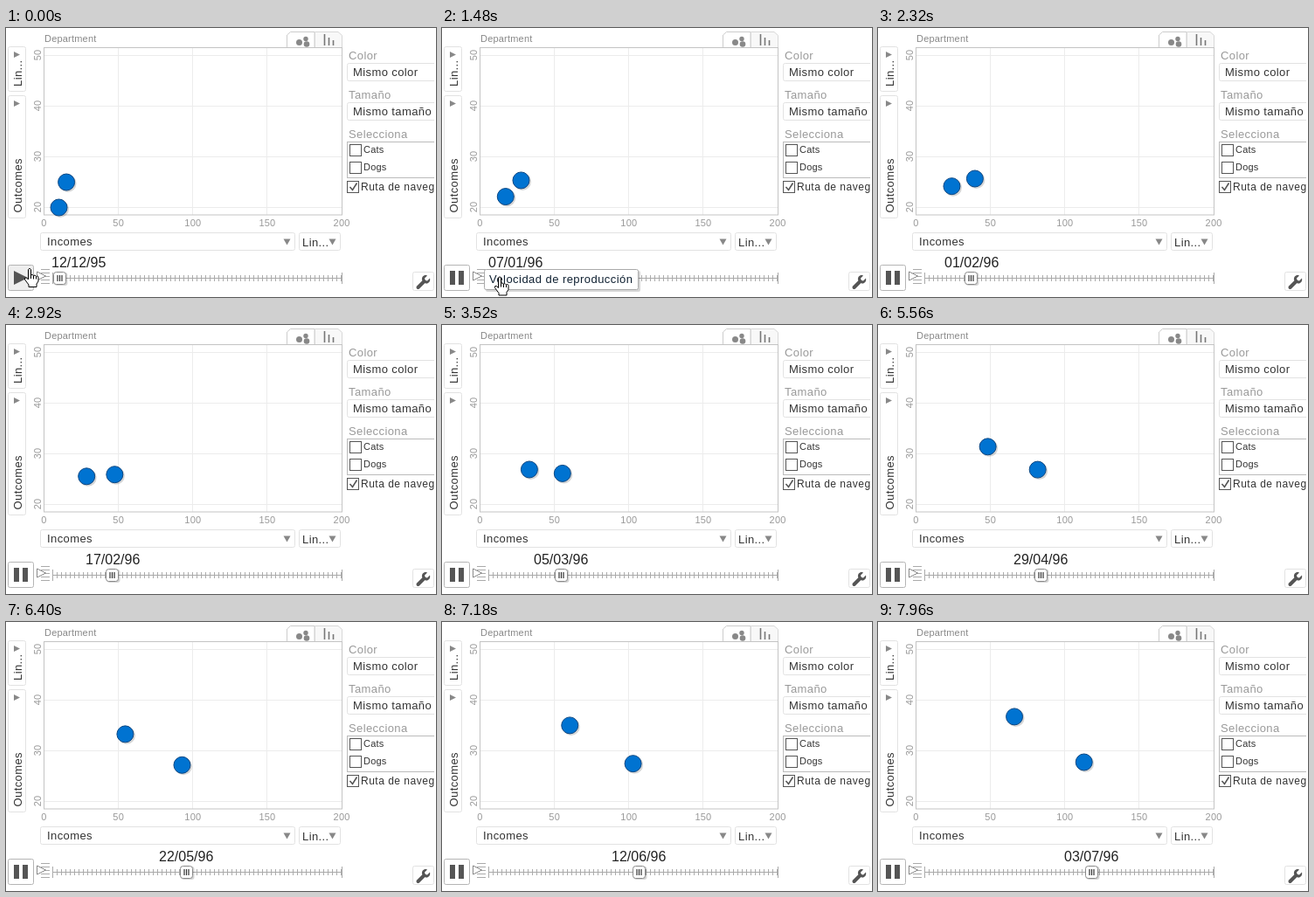
An HTML page that plays this animation: 492 by 308 pixels, repeating every 8 s.

```html
<!DOCTYPE html>
<html lang="es">
<head>
<meta charset="utf-8">
<style>
  html, body { margin: 0; width: 100%; height: 100%; overflow: hidden; background: #fff; }
  svg { display: block; font: 13px "Liberation Sans", Arial, sans-serif; letter-spacing: .4px; fill: #333; }
  .box { fill: #fff; stroke: #e2e2e2; }
  .line { fill: none; stroke: #aaa; }
  .grid { fill: none; stroke: #ececec; }
  .label { fill: #999; }
  .small { font-size: 11px; letter-spacing: .2px; }
  .check { fill: #fff; stroke: #555; }
  .arrow { fill: #888; }
  .icon { fill: #555; }
  .dot { fill: #0073d1; stroke: #0a4682; }
  .shadow { fill: #000; opacity: .16; }
  .date { font-size: 16px; letter-spacing: 0; fill: #222; }
  .tip { letter-spacing: .45px; fill: #123; }
</style>
</head>
<body>
<svg width="492" height="308" viewBox="0 0 492 308">
  <!-- chart -->
  <text class="small" x="44" y="16" fill="#888">Department</text>
  <path d="M321.500 22V8l4-3.500H353V22" fill="#fff" stroke="#ccc"/>
  <path d="M353.500 22V4.500H380l4.500 4V22" fill="#f8f8f8" stroke="#d8d8d8"/>
  <g fill="#888"><circle cx="335.500" cy="16.500" r="3.500"/><circle cx="343" cy="12.500" r="2.700"/><circle cx="344" cy="18.500" r="3.300"/></g>
  <path d="M364.500 7v13M369.500 11v9M374.500 14v6" stroke="#777" stroke-width="1.600"/>
  <path class="grid" d="M128.500 23V214M213.500 23V214M298.500 23V214M44 31.500H384M44 89.500H384M44 147.500H384M44 205.500H384"/>
  <rect x="43.500" y="22.500" width="341" height="191.500" fill="none" stroke="#c4c4c4"/>
  <g id="axes" class="small label" text-anchor="middle"></g>
  <g id="dots"></g>

  <!-- axis pickers -->
  <rect class="box" x="2.500" y="21.500" width="20" height="51" rx="2"/>
  <rect class="box" x="2.500" y="77.500" width="20" height="140" rx="2"/>
  <path class="arrow" d="M9 27l7 3.500-7 3.500zM9 83l7 3.500-7 3.500z"/>
  <text transform="translate(18 67) rotate(-90)">Lin...</text>
  <text transform="translate(18 211.500) rotate(-90)">Outcomes</text>
  <rect class="box" x="39.500" y="234.500" width="291" height="20" rx="2"/>
  <rect class="box" x="335.500" y="234.500" width="47" height="20" rx="2"/>
  <path class="arrow" d="M317.500 241.500h8l-4 7zM369.500 241.500h8l-4 7z"/>
  <text x="47" y="249">Incomes</text>
  <text x="339" y="250">Lin...</text>

  <!-- side panel -->
  <svg width="490" height="308">
    <g class="label">
      <text x="392" y="36">Color</text>
      <text x="392" y="81">Tamaño</text>
      <text x="392" y="126">Selecciona</text>
    </g>
    <rect class="box" x="390.500" y="40.500" width="120" height="20" rx="2"/>
    <rect class="box" x="390.500" y="85.500" width="120" height="20" rx="2"/>
    <text x="397" y="55">Mismo color</text>
    <text x="397" y="100">Mismo tamaño</text>
    <rect x="390.500" y="130.500" width="120" height="41" fill="#fff" stroke="#bbb"/>
    <rect class="check" x="393.500" y="133.500" width="13" height="13"/>
    <rect class="check" x="393.500" y="153.500" width="13" height="13"/>
    <rect class="check" x="390.500" y="175.500" width="13" height="13"/>
    <path d="M393.500 182l3 3.500 5-8" fill="none" stroke="#555" stroke-width="1.600"/>
    <g class="small">
      <text x="409" y="143">Cats</text>
      <text x="409" y="163">Dogs</text>
    </g>
    <text x="406" y="186" style="font-size:12px;letter-spacing:.5px">Ruta de naveg</text>
    <rect class="box" x="465.500" y="279.500" width="24" height="21" rx="2"/>
    <g transform="translate(0 1)">
      <path d="M471.500 296l7-7" stroke="#555" stroke-width="4" stroke-linecap="round"/>
      <path class="icon" d="M482 282.500l-3 3 .5 2.500 2.500.5 3-3c1 4-2 6.500-5 6l-4-4c-.5-4 2.500-6.500 6-5z"/>
    </g>
  </svg>

  <!-- player -->
  <rect id="button" x="2.500" y="271.500" width="29" height="29" rx="2" stroke="#b5b5b5"/>
  <path id="buttonIcon" class="icon"/>
  <path class="line" d="M40 276.500h10M40 280.500h10M40 284.500h10M40 288.500h10M40 292.500h10"/>
  <path d="M35.500 279v10l10-5z" fill="#fff" stroke="#888"/>
  <path id="ticks" class="line"/>
  <g id="knob">
    <rect class="shadow" x="-6" y="280" width="15" height="15" rx="3"/>
    <rect x="-7" y="279.500" width="14" height="14" rx="3" fill="#fff" stroke="#888"/>
    <path d="M-2.500 283v7M0 283v7M2.500 283v7" stroke="#333" stroke-width="1.200"/>
  </g>
  <text id="date" class="date" y="274"></text>
  <g id="tip">
    <rect class="shadow" x="50" y="278" width="177" height="24" rx="2"/>
    <rect x="48.500" y="276.500" width="176" height="23" rx="2" fill="#fff" stroke="#aaa"/>
    <text class="tip" x="54" y="292">Velocidad de reproducción</text>
  </g>
  <path id="hand" fill="#fff" stroke="#000" stroke-linejoin="round"
    d="M-1.500 13V1.500Q0-1 1.500 1.500V8Q3 6.500 4.500 8.500Q6 7 7.500 9.500Q10 8 10 11V15L8 18V21.500H-1V19L-5.500 13Q-6 10-3.500 11ZM1.500 8v4M4.500 8.500v4M7.500 9.500v3"/>
</svg>
<script>
  const LOOP = 8000, START = 400, STEP = 60, DAY = 864e5;
  const FIRST = Date.UTC(1995, 11, 12);
  const TIP_ON = 1120, TIP_OFF = 1780;
  const $ = id => document.getElementById(id);

  // [time, elapsed days] and [time, fingertip x, fingertip y]
  const days = [[400, 0], [1480, 26.2], [2320, 51.2], [3520, 84.2], [4720, 116.2], [6400, 162.2], [7960, 204.2]];
  const path = [[640, 27, 275], [1180, 46, 281], [1480, 66, 284.5]];
  // start and drift per day
  const movers = [[60.5, 205.5, .468, -.4755], [69.1, 176.5, .816, -.0784]];

  function at(keys, t, col = 1) {
    if (t <= keys[0][0]) return keys[0][col];
    for (let i = 1; i < keys.length; i++) {
      const a = keys[i - 1], b = keys[i];
      if (t <= b[0]) return a[col] + (b[col] - a[col]) * (t - a[0]) / (b[0] - a[0]);
    }
    return keys[keys.length - 1][col];
  }

  let labels = '';
  for (let v = 0; v <= 200; v += 50) labels += `<text x="${43.5 + v * 1.703}" y="227">${v}</text>`;
  for (let v = 20; v <= 50; v += 10) labels += `<text transform="translate(40 ${321 - v * 5.8}) rotate(-90)">${v}</text>`;
  $('axes').innerHTML = labels;

  $('dots').innerHTML = movers.map(() =>
    '<g><circle class="shadow" cx="1.5" cy="1.5" r="10"/><circle class="dot" r="9.5"/></g>').join('');

  let ticks = 'M53.5 280v13M384.500 280v13M53 286.500H385';
  for (let x = 58.5; x < 384; x += 5) ticks += `M${x} 283v7`;
  $('ticks').setAttribute('d', ticks);

  const move = (el, x, y) => el.setAttribute('transform', `translate(${x} ${y})`);
  const show = (el, on) => el.setAttribute('visibility', on ? 'visible' : 'hidden');

  function draw(now) {
    let t = now % LOOP;
    const playing = t >= START;
    t = playing ? START + Math.floor((t - START) / STEP) * STEP : 0;
    const d = at(days, t), x = 61 + d * .898;

    movers.forEach(([x0, y0, dx, dy], i) => move($('dots').children[i], x0 + d * dx, y0 + d * dy));
    move($('knob'), Math.floor(x) + .5, 0);
    $('date').setAttribute('x', Math.max(52, Math.round(x - 31.2)));
    const [yy, mm, dd] = new Date(FIRST + Math.floor(d) * DAY).toISOString().slice(2, 10).split('-');
    $('date').textContent = `${dd}/${mm}/${yy}`;

    $('button').setAttribute('fill', playing ? '#fff' : '#eee');
    $('buttonIcon').setAttribute('d', playing ? 'M9 278h6v16h-6zM19 278h6v16h-6z' : 'M9 278l16 8-16 8z');
    show($('tip'), t >= TIP_ON && t < TIP_OFF);
    show($('hand'), t < TIP_OFF);
    move($('hand'), at(path, t), at(path, t, 2));
  }

  function loop() {
    draw(performance.now());
    requestAnimationFrame(loop);
  }
  loop();
</script>
</body>
</html>
```
